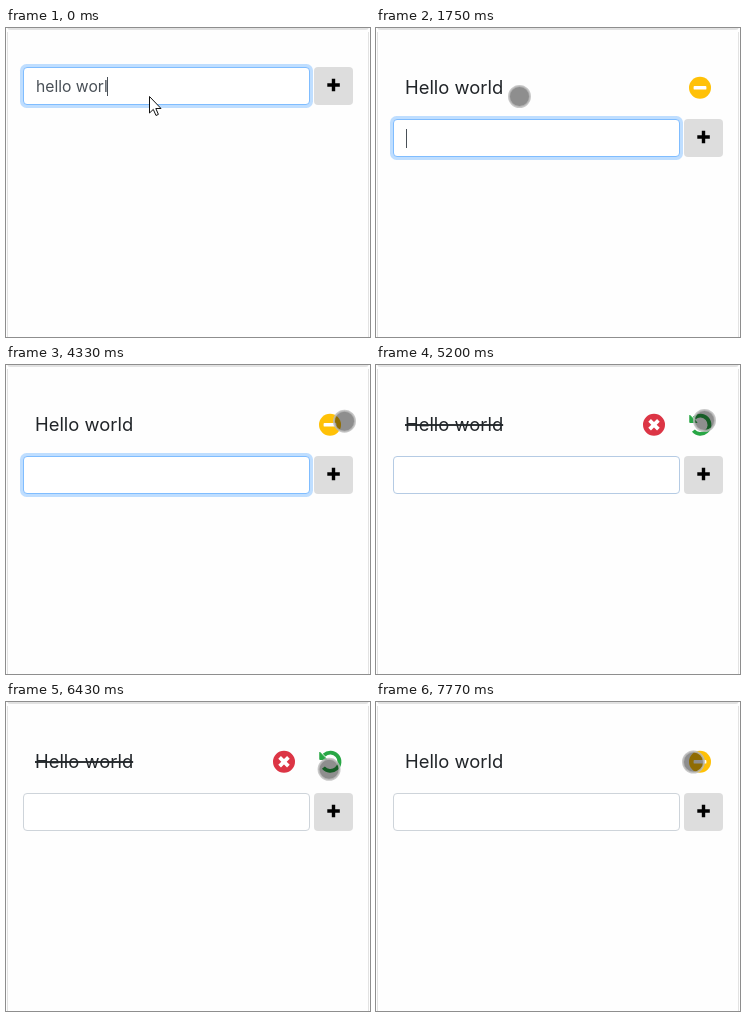
An HTML page that plays this animation: 364 by 309 pixels, repeating every 8 s.

```html
<!DOCTYPE html>
<html lang="en">
<head>
<meta charset="utf-8">
<title>To-do list</title>
<style>
  html, body { margin: 0; width: 100%; height: 100%; overflow: hidden; background: #fefefe; }
  svg { display: block; }
  text { font-family: Inter, Roboto, sans-serif; white-space: pre; }
  .done text { text-decoration: line-through 1.3px; }
</style>
</head>
<body>
<svg width="364" height="309">
  <path d="M1.5 4V309M362.5 4V309" stroke="#e2e2e2"/>
  <path d="M2 0Q3 1 5 1H359Q361 1 362 0" fill="none" stroke="#e2e2e2" stroke-width="2"/>

  <g id="item">
    <text x="29" y="66" font-size="18.4" fill="#212529">Hello world</text>
    <g id="minus" transform="translate(324 59.8)">
      <circle r="11" fill="#ffc107"/>
      <rect x="-6.4" y="-1.8" width="12.8" height="3.6" rx=".9" fill="#fff"/>
    </g>
    <g id="actions">
      <g transform="translate(278 59.8) rotate(45)">
        <circle r="11" fill="#dc3545"/>
        <path d="M-6.2 0H6.2M0-6.2V6.2" stroke="#fff" stroke-width="3.8"/>
      </g>
      <g transform="translate(324.4 59.8)">
        <path d="M-6.3-6.6A9.1 9.1 0 1 1-7 5.8" fill="none" stroke="#28a745" stroke-width="3.8"/>
        <path d="M-10.6-9.5V-2.3H-3.4Z" fill="#28a745" stroke="#28a745" stroke-linejoin="round"/>
      </g>
    </g>
  </g>

  <g id="form">
    <rect id="glow" x="14" y="36" width="293" height="44" rx="6.5" fill="#bfdeff"/>
    <rect id="field" x="17.5" y="39.5" width="286" height="37" rx="3.5" fill="#fff"/>
    <text id="typed" x="30" y="64" font-size="15.7" fill="#495057"></text>
    <rect id="caret" y="49" width="1" height="19" fill="#495057"/>
    <rect x="308" y="39" width="39" height="38" rx="4" fill="#ddd"/>
    <path d="M321.3 57H333.8M327.5 50.8V63.2" stroke="#000" stroke-width="3.4"/>
  </g>

  <path id="arrow" d="M143.5 68.5V85L147.3 81.4 150 87.5 152.4 86.4 149.8 80.5H155Z" fill="#fff" stroke="#111"/>
  <circle id="touch" r="10.5" fill="#000" fill-opacity=".44" stroke="#bbb" stroke-opacity=".8" stroke-width="2"/>
</svg>
<script>
const LOOP = 8000, STEP = 136, BLINK = 500;
const TYPED = 150, ADDED = 1750, STRUCK = 5200, RESTORED = 7770;

// Pointer moves: start and end time, then where it goes
const moves = [
  [2600, 2992, 353.5, 172.5],
  [3270, 3670, 390, 60],
  [3950, 4490, 328.5, 55.5],
  [5440, 5700, 275.5, 55.5],
  [5830, 6120, 328.5, 68.5],
  [6290, 6750, 285.5, 59.5],
  [6890, 7200, 317.5, 60]
];

const el = id => document.getElementById(id);
const show = (id, on) => el(id).setAttribute('display', on ? 'inline' : 'none');
const set = (id, attrs) => { for (const k in attrs) el(id).setAttribute(k, attrs[k]); };

function ease(from, to, t) {
  const p = Math.min(1, Math.max(0, (t - from) / (to - from)));
  return p * p * (3 - 2 * p);
}

function pointerAt(t) {
  let x = 143.5, y = 68.5;
  for (const [from, to, toX, toY] of moves) {
    const p = ease(from, to, t);
    x += (toX - x) * p;
    y += (toY - y) * p;
  }
  return { cx: x, cy: y };
}

function draw(t) {
  // Pointer and caret advance in coarse steps, like a screen recording
  const stepped = Math.floor((t + 26) / STEP) * STEP;
  const added = t >= ADDED, focused = t < STRUCK;
  const done = t >= STRUCK && t < RESTORED;

  show('item', added);
  el('item').classList.toggle('done', done);
  show('minus', !done);
  show('actions', done);

  set('form', { transform: `translate(0 ${added ? 52 : 0})` });
  el('typed').textContent = added ? '' : t < TYPED ? 'hello worl' : 'hello world';
  show('glow', focused);
  set('field', { stroke: focused ? '#80bdff' : t < STRUCK + 120 ? '#b5cbe4' : '#ced4da' });

  const blinkStart = added ? 1610 : 110;
  set('caret', { x: added ? 30 : t < TYPED ? 101 : 111 });
  show('caret', focused && Math.trunc((stepped - blinkStart) / BLINK) % 2 === 0);

  show('arrow', t < 1080);
  show('touch', t >= 1480);
  set('touch', { ...pointerAt(stepped), opacity: t < 1610 ? .5 : 1 });
}

const start = performance.now();
function tick() {
  draw((performance.now() - start) % LOOP);
  requestAnimationFrame(tick);
}
tick();
</script>
</body>
</html>
```
